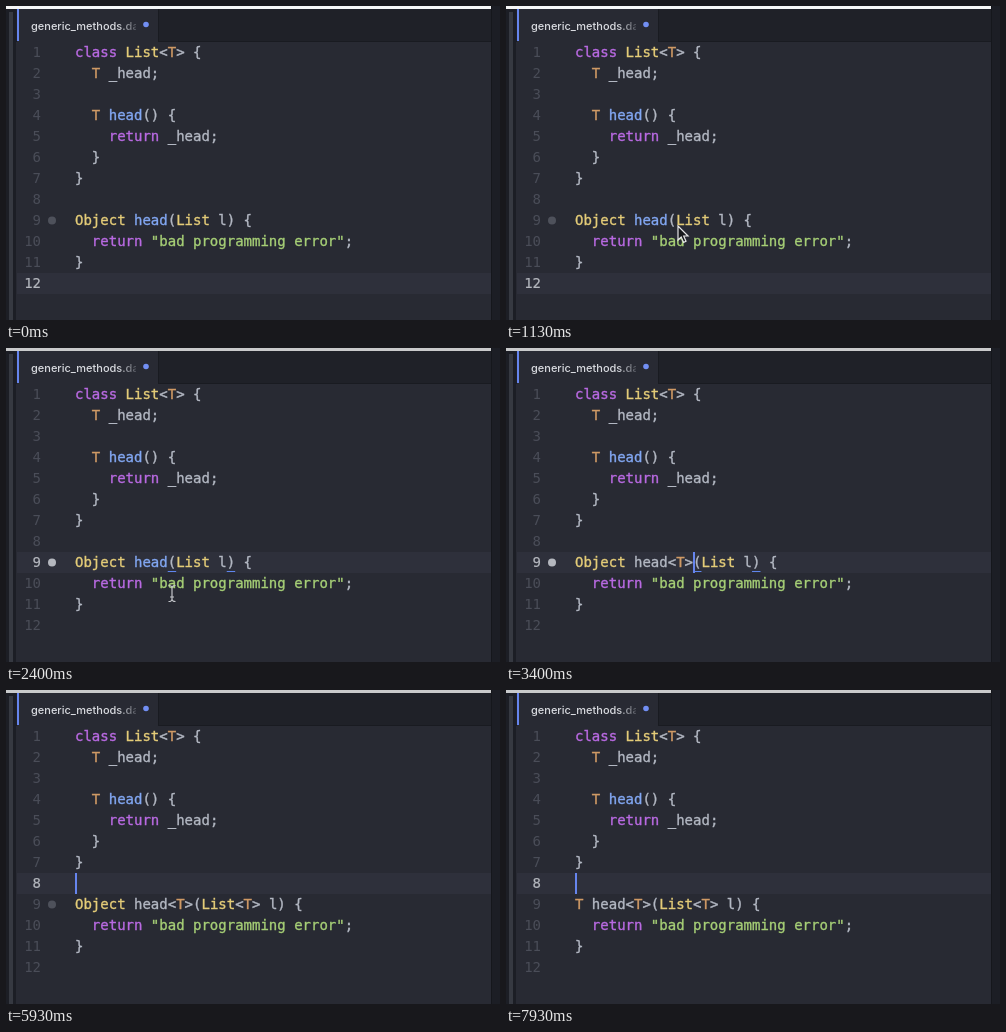
These frames come from a looping animation (494 by 314 pixels, 8000 ms). An HTML page with a canvas:

```html
<!DOCTYPE html>
<html lang="en">
<head>
<meta charset="utf-8">
<title>Generic methods</title>
<style>
html, body { margin: 0; width: 100%; height: 100%; overflow: hidden; background: #282a33; }
canvas { display: block; width: 494px; height: 314px; }
</style>
</head>
<body>
<canvas id="stage"></canvas>
<script>
const W = 494, H = 314, LOOP = 8000;
const CHAR = 8.43, ROW = 21, LEFT = 69, TOP = 36;
const CLICK = 1650, TYPE = 2620, LINT_OK = 7600;

const canvas = document.getElementById('stage');
const ctx = canvas.getContext('2d');
const dpr = window.devicePixelRatio || 1;
canvas.width = W * dpr;
canvas.height = H * dpr;

const color = {
  text: '#b3b8c3', keyword: '#b96ae2', type: '#e4cc78', param: '#d09a66',
  func: '#82a7f2', string: '#a6cf76', number: '#4a4d58', active: '#b4b7be',
  editor: '#282a33', line: '#2e303b', bar: '#1f2128', accent: '#6685ee'
};
const kinds = {
  class: 'keyword', return: 'keyword', List: 'type', Object: 'type', T: 'param'
};

const code = [
  'class List<T> {', '  T _head;', '', '  T head() {', '    return _head;',
  '  }', '}', '', '', '  return "bad programming error";', '}', ''
];

// Each edit: time, row, column, text of the ninth line
const edits = [[0, 11, 0, 'Object head(List l) {']];
function edit(time, row, col, text) {
  edits.push([time, row, col, text || edits[edits.length - 1][3]]);
}
edit(CLICK, 8, 11);
edit(TYPE, 8, 12, 'Object head<(List l) {');
edit(2930, 8, 13, 'Object head<T(List l) {');
edit(3130, 8, 14, 'Object head<T>(List l) {');
[3600, 3750, 3900, 4050, 4200].forEach((time, i) => edit(time, 8, 15 + i));
edit(5070, 8, 20, 'Object head<T>(List< l) {');
edit(5200, 8, 21, 'Object head<T>(List<T l) {');
edit(5330, 8, 22, 'Object head<T>(List<T> l) {');
edit(5600, 7, 0);
edit(6200, 8, 22);
edit(6450, 8, 0);
edit(6700, 8, 6);
edit(7150, 8, 1, 'T head<T>(List<T> l) {');
edit(7550, 7, 0);

// Mouse path: time, x, y
const path = [[70, 250, 290], [870, 175, 224], [1130, 172, 220], [1500, 164, 214],
  [1800, 164, 214], [2300, 166, 245]];

const colX = col => LEFT + col * CHAR;
const rowY = row => TOP + row * ROW;

function rect(x, y, w, h, fill) {
  ctx.fillStyle = fill;
  ctx.fillRect(x, y, w, h);
}

function dot(x, y, r, fill) {
  ctx.fillStyle = fill;
  ctx.beginPath();
  ctx.arc(x, y, r, 0, Math.PI * 2);
  ctx.fill();
}

function mono(text, x, row, fill, weight) {
  ctx.font = '14px "DejaVu Sans Mono", monospace';
  ctx.fillStyle = ctx.strokeStyle = fill;
  ctx.lineWidth = weight;
  ctx.fillText(text, x, rowY(row) + 15);
  if (weight) ctx.strokeText(text, x, rowY(row) + 15);
}

function drawCode(text, row) {
  for (const match of text.matchAll(/"[^"]*"|\w+|[^\w\s"]+/g)) {
    const word = match[0], next = text[match.index + word.length];
    let kind = kinds[word] || 'text';
    if (word[0] === '"') kind = 'string';
    if (word === 'head' && next === '(') kind = 'func';
    mono(word, colX(match.index), row, color[kind], 0.35);
  }
}

function drawFrame(focused) {
  rect(0, 0, W, H, '#1c1e25');
  rect(3, 6, 4, H - 6, '#363941');
  rect(10, 3, 475, H - 3, color.editor);
  rect(10, 3, 475, 32, color.bar);
  rect(10, 35, 475, 1, '#191b21');
  rect(11, 3, 142, 33, color.editor);
  rect(152, 3, 1, 33, '#191b21');
  rect(11, 3, 2, 32, color.accent);
  rect(0, 0, 485, 3, focused ? '#c9cacb' : '#f5f6f6');
  rect(485, 0, 1, H, '#15171c');

  const fade = ctx.createLinearGradient(112, 0, 131, 0);
  fade.addColorStop(0, '#d9dbe0');
  fade.addColorStop(1, '#4a4d56');
  ctx.font = '500 11px Inter, sans-serif';
  ctx.fillStyle = fade;
  ctx.save();
  ctx.beginPath();
  ctx.rect(13, 3, 117, 32);
  ctx.clip();
  ctx.fillText('generic_methods.dart', 25, 24);
  ctx.restore();
  dot(140, 18.5, 2.8, '#728ff3');
}

function mouseAt(t) {
  let i = 0;
  while (i < path.length - 2 && t > path[i + 1][0]) i++;
  const [t0, x0, y0] = path[i], [t1, x1, y1] = path[i + 1];
  const p = Math.min(1, Math.max(0, (t - t0) / (t1 - t0)));
  const k = p * p * (3 - 2 * p);
  return [x0 + (x1 - x0) * k, y0 + (y1 - y0) * k];
}

function drawMouse(t) {
  if (t < 70 || t >= TYPE) return;
  ctx.save();
  ctx.translate(...mouseAt(t));
  if (t < CLICK) {
    const arrow = new Path2D('M0 0V14L3.2 11L5.6 16.4L8 15.3L5.7 10H10Z');
    ctx.fillStyle = '#17181c';
    ctx.strokeStyle = '#e6e6e8';
    ctx.lineWidth = 1.2;
    ctx.fill(arrow);
    ctx.stroke(arrow);
  } else {
    ctx.strokeStyle = '#c3c5ca';
    ctx.lineWidth = 1.2;
    ctx.stroke(new Path2D('M-3.5 -7.5Q0 -7.5 0 -5Q0 -7.5 3.5 -7.5M0 -5V6M-3.5 8.5Q0 8.5 0 6Q0 8.5 3.5 8.5M-2 4H2'));
  }
  ctx.restore();
}

function drawBrackets(text, col) {
  const open = text.indexOf('(');
  if (col !== open && col !== open + 1) return;
  for (const at of [open, text.indexOf(')')]) {
    rect(colX(at), rowY(9) - 2, CHAR, 1, '#5f86ed');
  }
}

function caretOn(age) {
  return age < 500 || (age - 500) % 800 >= 400;
}

function draw(t) {
  ctx.setTransform(dpr, 0, 0, dpr, 0, 0);
  const [since, row, col, text] = edits.findLast(e => e[0] <= t);
  const focused = t >= CLICK;
  drawFrame(focused);
  rect(11, rowY(row), 474, ROW, color.line);
  if (t >= 6700 && t < 7150) rect(LEFT, rowY(8), 6 * CHAR, ROW, '#3e4451');

  ctx.textAlign = 'right';
  for (let i = 0; i < 12; i++) {
    mono(i + 1, 35, i, i === row ? color.active : color.number, i === row ? 0.2 : 0);
  }
  ctx.textAlign = 'left';
  if (t < LINT_OK) dot(46, 214.5, 4, row === 8 ? color.active : '#4e515b');

  code.forEach((line, i) => drawCode(i === 8 ? text : line, i));
  if (row === 8) drawBrackets(text, col);
  if (focused && caretOn(t - since)) {
    rect(Math.round(colX(col)), rowY(row), 2, ROW, color.accent);
  }
  drawMouse(t);
}

function tick(now) {
  draw(now % LOOP);
  requestAnimationFrame(tick);
}
draw(0);
requestAnimationFrame(tick);
</script>
</body>
</html>
```
